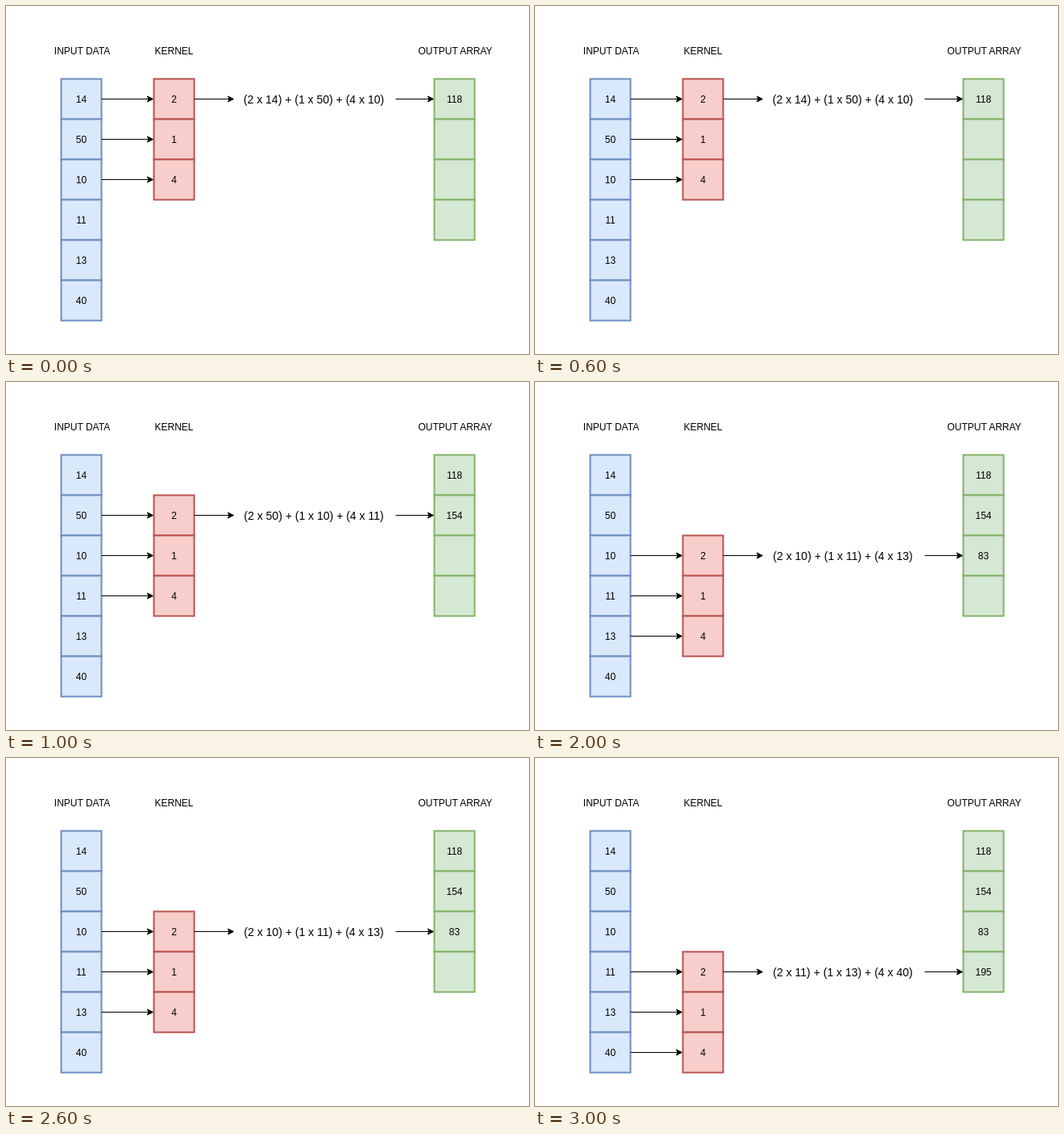
Animation of 649 by 432 pixels, one loop 4000 ms. Source, as an HTML page:

```html
<!DOCTYPE html>
<html lang="en">
<head>
<meta charset="utf-8">
<title>1D convolution</title>
<style>
  html, body { margin: 0; width: 100%; height: 100%; overflow: hidden; background: #fff; }
  svg { display: block; width: 649px; height: 432px; }
  text { font: 12px "Liberation Sans", Arial, sans-serif; text-anchor: middle; fill: #000; }
  .sum { font-size: 14px; }
  .arrow { fill: #000; stroke: #000; stroke-width: 1; stroke-miterlimit: 10; }
</style>
</head>
<body>
<svg id="stage" viewBox="0 0 649 432"></svg>
<script>
const NS = "http://www.w3.org/2000/svg";
const CELL = 50, TOP = 90.5, STEP_MS = 1000;
const input = [14, 50, 10, 11, 13, 40];
const kernel = [2, 1, 4];
const steps = input.length - kernel.length + 1;
const BLUE = ["#dae8fc", "#6c8ebf"];
const RED = ["#f8cecc", "#b85450"];
const GREEN = ["#d5e8d4", "#82b366"];

function add(parent, tag, attrs, content = "") {
  const node = document.createElementNS(NS, tag);
  for (const key in attrs) node.setAttribute(key, attrs[key]);
  node.textContent = content;
  return parent.appendChild(node);
}

function label(parent, x, y, content, attrs = {}) {
  return add(parent, "text", { x, y, ...attrs }, content);
}

// Draws a stack of cells and returns their text nodes.
function column(parent, x, values, [fill, stroke]) {
  return values.map((value, i) => {
    const y = TOP + i * CELL;
    add(parent, "rect", { x, y, width: CELL, height: CELL, fill, stroke, "stroke-width": 2 });
    return label(parent, x + CELL / 2, y + 29.5, value);
  });
}

function arrow(parent, from, to, row) {
  const y = TOP + (row + 0.5) * CELL;
  const tip = to - 1.12;
  add(parent, "path", {
    class: "arrow",
    d: `M${from} ${y}H${tip - 5.25}M${tip} ${y}l-7 3.5l1.75 -3.5l-1.75 -3.5Z`
  });
}

const stage = document.getElementById("stage");
label(stage, 94.5, 60, "INPUT DATA");
label(stage, 208.5, 60, "KERNEL");
label(stage, 557.5, 60, "OUTPUT ARRAY");
column(stage, 68.5, input, BLUE);
const results = column(stage, 531.5, Array(steps).fill(""), GREEN);

const slider = add(stage, "g", {});
column(slider, 183.5, kernel, RED);
kernel.forEach((_, i) => arrow(slider, 118.5, 183.5, i));
arrow(slider, 233.5, 283.5, 0);
arrow(slider, 483.5, 531.5, 0);
const sum = label(slider, 382, 121, "", { class: "sum" });

const output = Array.from({ length: steps }, (_, s) =>
  kernel.reduce((total, k, i) => total + k * input[s + i], 0));

let shown = -1;
function draw(time) {
  const step = Math.floor(time / STEP_MS) % steps;
  if (step === shown) return;
  shown = step;
  slider.setAttribute("transform", `translate(0 ${step * CELL})`);
  sum.textContent = kernel.map((k, i) => `(${k} x ${input[step + i]})`).join(" + ");
  results.forEach((node, i) => { node.textContent = i <= step ? output[i] : ""; });
}

const start = performance.now();
function tick() {
  draw(performance.now() - start);
  requestAnimationFrame(tick);
}
tick();
</script>
</body>
</html>
```
